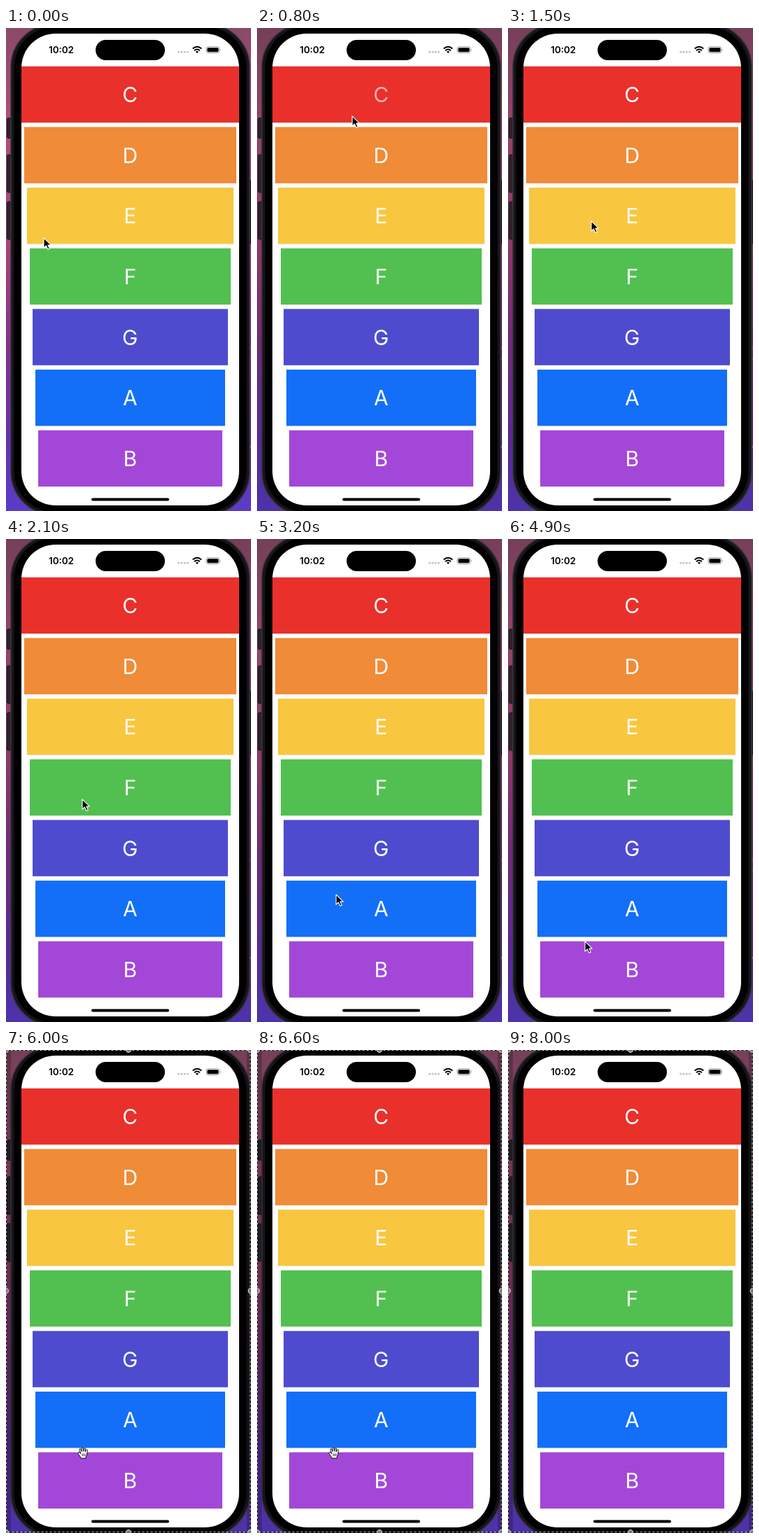
An HTML page that plays this animation: 350 by 690 pixels, repeating every 8800 ms.

```html
<!DOCTYPE html>
<html lang="en">
<head>
<meta charset="utf-8">
<title>Xylophone</title>
<style>
html, body { margin: 0; width: 100%; height: 100%; overflow: hidden; background: #000; }
svg { display: block; width: 350px; height: 690px; }
text { font-family: Inter, Roboto, sans-serif; }
.key { font-size: 30px; fill: #fff; text-anchor: middle; }
.clock { font-size: 13.4px; font-weight: 600; }
</style>
</head>
<body>
<svg viewBox="0 0 350 690">
  <defs>
    <linearGradient id="wall" x2="0" y2="1">
      <stop offset="0" stop-color="#8a4a68"/>
      <stop offset=".2" stop-color="#b04f7c"/>
      <stop offset=".45" stop-color="#a64478"/>
      <stop offset=".65" stop-color="#84328c"/>
      <stop offset=".85" stop-color="#6830ae"/>
      <stop offset="1" stop-color="#5b3cc8"/>
    </linearGradient>
  </defs>
  <rect width="350" height="690" fill="url(#wall)"/>
  <rect id="shade" width="350" height="690" opacity="0"/>
  <g fill="#c9985c" opacity=".6">
    <path d="M347 456h3v1h-3zM348 459h2v1h-2zM347 473h3v1h-3zM348 597h2v3h-2z"/>
  </g>

  <g id="buttons" fill="#29242c" stroke="#151217" stroke-width=".8">
    <rect x="1.4" y="128.5" width="7" height="29" rx="2"/>
    <rect x="1.4" y="181" width="7" height="54" rx="2"/>
    <rect x="1.4" y="248" width="7" height="54" rx="2"/>
    <rect x="345" y="217" width="5" height="92" rx="2"/>
  </g>
  <rect x="7" y="-6" width="341" height="702" rx="62" fill="#17151a" stroke="#39343d" stroke-width="1.6"/>
  <rect x="11.5" y="-2" width="332" height="694" rx="59"/>
  <rect x="22" y="8" width="311" height="674" rx="49" fill="#fff"/>
  <rect x="128" y="17" width="99" height="29" rx="14.5"/>
  <rect x="122" y="671.5" width="111" height="4" rx="2"/>

  <text class="clock" x="61" y="36">10:02</text>
  <g fill="#c4c4c6">
    <circle cx="246.6" cy="34.3" r="1.5"/><circle cx="250.9" cy="34.3" r="1.5"/>
    <circle cx="255.2" cy="34.3" r="1.5"/><circle cx="259.5" cy="34.3" r="1.5"/>
  </g>
  <g fill="none" stroke="#000" stroke-width="2">
    <path d="M266.7 29.6Q273 24 279.3 29.6M269 32.2Q273 28.8 277 32.2"/>
  </g>
  <path d="M270.8 33.7Q273 32.2 275.2 33.7L273 36z"/>
  <rect x="286" y="26.8" width="19" height="8.8" rx="2.8" fill="none" stroke="#8e8e90" stroke-width=".9"/>
  <rect x="287.4" y="28.2" width="16.2" height="6" rx="1.6"/>
  <path d="M306.1 29.7q1.7 1.5 0 3z" fill="#8e8e90"/>

  <g id="keys"></g>

  <g id="frame">
    <rect width="7" height="690" opacity=".22"/>
    <rect x="344" width="6" height="690" opacity=".22"/>
    <g fill="none">
      <rect x=".5" y=".5" width="348.5" height="688" stroke="#111"/>
      <rect x=".5" y=".5" width="348.5" height="688" stroke="#bbb" stroke-dasharray="3 3"/>
    </g>
    <g id="grips" fill="#777" stroke="#e4e4e4"></g>
  </g>

  <path id="arrow" d="M1 .8V15.2L4.4 12 6.8 17.3 9.2 16.2 6.9 11.1H11.3z" stroke="#fff" stroke-width="1.1" stroke-linejoin="round"/>
  <g id="hand" transform="translate(102 567)" fill="#fff" stroke="#000" stroke-linejoin="round">
    <path d="M5 16.2C4.4 13.8 2.5 12 1 9.6C.2 8 1.8 7 3.2 8.2L4.6 9.7L3 4.3C2.6 2.5 4.5 2 5.1 3.7L6.1 6.5L5.9 2.3C5.9 .6 8 .5 8.2 2.2L8.6 6.3L9.3 2.6C9.7 1 11.6 1.4 11.4 3L11.1 7L12.4 4.5C13.2 3 14.9 3.8 14.4 5.4C13.5 8.5 14.2 11.5 12.3 13.8L12 16.2z"/>
    <path d="M7 9.5v3.6M9 9.5v3.6M11 9.5v3.6" fill="none" stroke-width=".8"/>
  </g>
</svg>

<script>
const LOOP = 8800, STEP = 100;
const $ = id => document.getElementById(id);

function add(parent, tag, attrs, label = '') {
  const el = document.createElementNS('http://www.w3.org/2000/svg', tag);
  for (const name in attrs) el.setAttribute(name, attrs[name]);
  el.textContent = label;
  return parent.appendChild(el);
}

// note, colour, press time
const notes = [
  ['C', '#e9302b', 600], ['D', '#f08b37', 1100], ['E', '#f9c63f', 1600],
  ['F', '#52c051', 2200], ['G', '#4e4bcf', 2700], ['A', '#136ff8', 3300],
  ['B', '#a347d8', 3900]
];

// time, x, y
const path = [
  [0, 53, 299], [200, 72, 252], [500, 135, 125], [800, 135, 125],
  [1000, 131, 178], [1200, 131, 178], [1500, 118, 275], [1700, 118, 275],
  [2000, 108, 371], [2200, 108, 371], [2500, 109, 440], [2800, 109, 440],
  [3100, 112, 507], [3400, 112, 507], [3600, 112, 517], [3900, 102, 604],
  [4200, 100, 604], [4500, 96, 598], [4600, 102, 586], [4800, 102, 586],
  [4900, 109, 574]
];

const labels = notes.map(([name, fill], i) => {
  const y = 54.8 + i * 86.65;
  add($('keys'), 'rect', { x: 22 + 4 * i, y, width: 311 - 8 * i, height: 80.4, fill });
  return add($('keys'), 'text', { class: 'key', x: 177.3, y: y + 51.2 }, name);
});

for (const [cx, cy] of [[0, 0], [175, 0], [349, 0], [0, 344], [349.5, 344], [0, 689], [175, 689], [349, 689]])
  add($('grips'), 'circle', { cx, cy, r: 3.5 });

function pointAt(t) {
  const next = path.findIndex(p => p[0] > t);
  if (next < 0) return path[path.length - 1].slice(1);
  const [t0, x0, y0] = path[next - 1], [t1, x1, y1] = path[next];
  const k = (t - t0) / (t1 - t0);
  return [x0 + (x1 - x0) * k, y0 + (y1 - y0) * k];
}

// dims on touch, then fades back
function glow(dt) {
  return dt < 0 || dt >= 400 ? 1 : 0.25 + 0.75 * dt / 400;
}

const show = (id, on) => $(id).setAttribute('visibility', on ? 'visible' : 'hidden');

function draw(now) {
  const t = Math.floor(now % LOOP / STEP) * STEP;
  labels.forEach((el, i) => el.setAttribute('opacity', glow(t - notes[i][2])));
  $('arrow').setAttribute('transform', `translate(${pointAt(t)})`);
  $('shade').setAttribute('opacity', t < 100 ? 0 : 0.15);
  show('arrow', t < 6000);
  show('frame', t >= 6000);
  show('hand', t >= 6000 && t < 6800);
}

let start;
function tick(now) {
  start ??= now;
  draw(now - start);
  requestAnimationFrame(tick);
}
draw(0);
requestAnimationFrame(tick);
</script>
</body>
</html>
```
